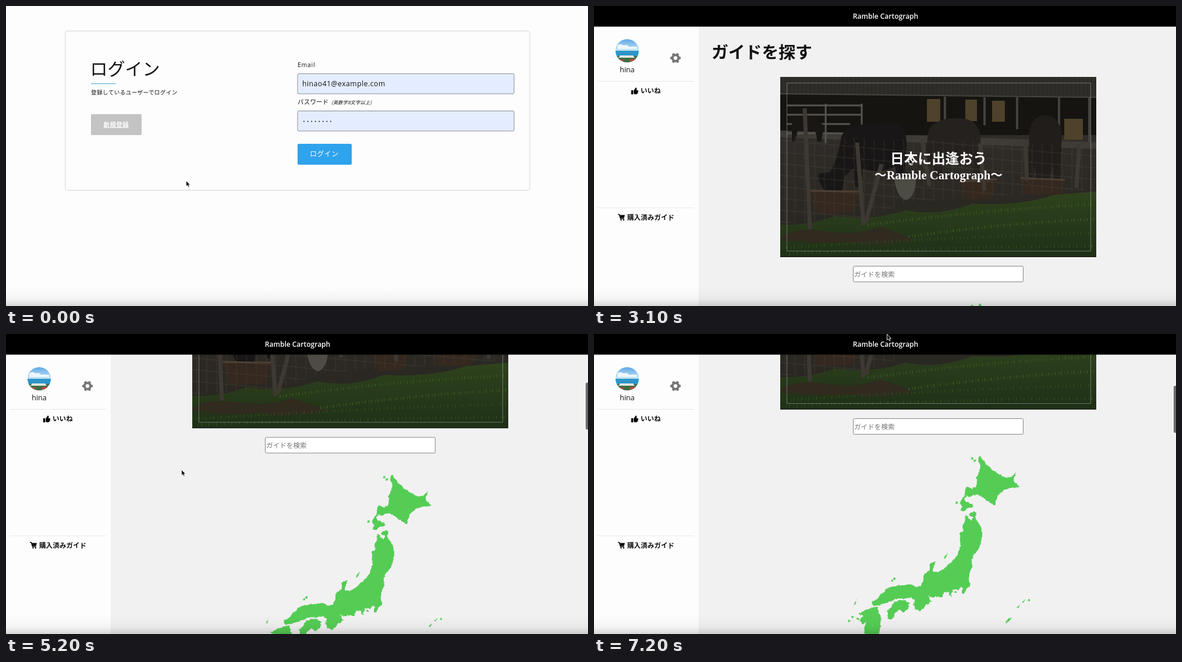
An HTML page for the animation above (7.3 s loop, 1000x516 px).

```html
<!DOCTYPE html>
<html lang="ja">
<head>
<meta charset="utf-8">
<title>Login and guide search</title>
<style>
@property --scroll { syntax: "<number>"; inherits: true; initial-value: 0; }

html, body { margin: 0; width: 100%; height: 100%; overflow: hidden; background: #fdfdfd; }
svg { display: block; }
text { font-family: "Noto Sans CJK JP", "Noto Sans CJK", sans-serif; font-size: 11.6px; fill: #111; white-space: pre; }
.latin { font-family: "Open Sans", "Noto Sans", sans-serif; }
.bold { font-weight: 700; }
.mid { text-anchor: middle; }
.light { fill: #fff; }
.field { fill: #e4edff; stroke: #898d95; }

/* All timelines are paused and positioned by the --t clock (ms). */
.home, .scroller, .status, .thumb, .cursor {
  animation: 7300ms linear calc(var(--t, 0) * -1ms) infinite paused;
}
.home, .status, .thumb { animation-timing-function: step-end; }
.home { animation-name: home; }
.status { animation-name: status; }
.thumb { animation-name: thumb; }
.scroller { animation-name: scroll; }
.cursor { animation-name: cursor; }
.page { transform: translateY(calc(var(--scroll) * -1px)); }
.bar { transform: translateY(calc(37px + var(--scroll) * .172px)); }

@keyframes home { 0% { visibility: hidden; } 38.3%, 100% { visibility: visible; } }
@keyframes status { 0% { visibility: hidden; } 30.1% { visibility: visible; } 38.3%, 100% { visibility: hidden; } }
@keyframes thumb { 0% { opacity: 0; } 54.7%, 100% { opacity: 1; } }
@keyframes scroll {
  0%, 53.425% { --scroll: 0; animation-timing-function: cubic-bezier(.3, .1, .65, .5); }
  57.534% { --scroll: 55.5; }
  63.014% { --scroll: 163; animation-timing-function: cubic-bezier(.3, .732, .65, .9); }
  75.342% { --scroll: 286; animation-timing-function: cubic-bezier(.3, .54, .6, 1); }
  84.932%, 100% { --scroll: 302; }
}
@keyframes cursor {
  0%, 12.329% { transform: translate(309px, 300px); animation-timing-function: ease-in-out; }
  27.397%, 45.205% { transform: translate(541px, 262px); animation-timing-function: ease-in-out; }
  50.685%, 86.301% { transform: translate(301px, 233px); animation-timing-function: ease-in-out; }
  97.26%, 100% { transform: translate(503px, 0); }
}
</style>
</head>
<body>
<svg width="1000" height="516" viewBox="0 0 1000 516">
  <defs>
    <linearGradient id="dock" x2="0" y2="1">
      <stop offset="0" stop-color="#000" stop-opacity="0"/>
      <stop offset=".6" stop-color="#000" stop-opacity=".035"/>
      <stop offset="1" stop-color="#000" stop-opacity=".15"/>
    </linearGradient>
    <linearGradient id="sky" x2="0" y2="1">
      <stop offset="0" stop-color="#5fa9e6"/>
      <stop offset="1" stop-color="#d8eefa"/>
    </linearGradient>
    <linearGradient id="soil" x2="0" y2="1">
      <stop offset="0" stop-color="#383632"/>
      <stop offset="1" stop-color="#2c2822"/>
    </linearGradient>
    <linearGradient id="grass" x2="0" y2="1">
      <stop offset="0" stop-color="#344a20"/>
      <stop offset="1" stop-color="#22351a"/>
    </linearGradient>
    <linearGradient id="chrome" x2="0" y2="1">
      <stop offset="0" stop-color="#d5d8dc"/>
      <stop offset="1" stop-color="#c5c9cd"/>
    </linearGradient>
    <pattern id="roof" width="7" height="34" patternUnits="userSpaceOnUse" y="122">
      <path d="M0 0H7V34H0Z" fill="#34332e"/>
      <path d="M1 0V34" stroke="#2a2925"/>
    </pattern>
    <pattern id="mesh" width="17" height="20" patternUnits="userSpaceOnUse" patternTransform="skewY(5)">
      <path d="M0 3H17M4 0L6 20" fill="none" stroke="#5a5247" stroke-width=".7"/>
    </pattern>
    <clipPath id="photo"><path d="M320 122H863V432H320Z"/></clipPath>
    <clipPath id="face"><circle cx="57" cy="77" r="20"/></clipPath>
    <filter id="coast" x="-5%" y="-5%" width="110%" height="110%" color-interpolation-filters="sRGB">
      <feTurbulence type="fractalNoise" baseFrequency=".22" numOctaves="2" seed="4"/>
      <feDisplacementMap in="SourceGraphic" scale="4" xChannelSelector="R" yChannelSelector="G"/>
    </filter>
    <filter id="soft" x="-10%" y="-60%" width="120%" height="220%"><feGaussianBlur stdDeviation="2"/></filter>
  </defs>

  <g class="login">
    <path d="M0 0H1000V516H0Z" fill="#fdfdfd"/>
    <rect x="102" y="43" width="798" height="274" rx="4" fill="#fdfdfd" stroke="#dfdfdf" stroke-width="1.3"/>
    <text x="144.5" y="119" style="font-size:30px;font-weight:300">ログイン</text>
    <path d="M146 133.7H189" stroke="#67b5dc" stroke-width="1.2"/>
    <text x="146" y="152" style="font-size:9.6px;letter-spacing:.4px;font-weight:500">登録しているユーザーでログイン</text>
    <rect x="146" y="186" width="87" height="36" rx="2" fill="#c3c3c3"/>
    <text class="bold light" x="167.5" y="207.5" style="font-size:10.4px;letter-spacing:.5px;text-decoration:underline">新規登録</text>

    <text class="latin" x="501" y="105" style="font-size:10.5px;letter-spacing:.7px">Email</text>
    <rect class="field" x="501" y="116.5" width="372" height="34.5" rx="2"/>
    <text class="latin" x="509" y="138" style="font-size:12.2px;letter-spacing:.5px">hinao41@example.com</text>
    <text x="501" y="169" style="font-size:10.4px;letter-spacing:.3px">パスワード</text>
    <text x="559" y="169" style="font-size:8.2px;letter-spacing:.2px;font-style:italic">(英数字8文字以上)</text>
    <rect class="field" x="501" y="180.5" width="372" height="34.5" rx="2"/>
    <path d="M512 198.5H559" stroke="#111" stroke-width="2" stroke-linecap="round" stroke-dasharray="0 6.55"/>
    <rect x="501" y="237" width="93" height="36" rx="2" fill="#2fa3ec"/>
    <text class="light" x="522" y="259.3" style="font-size:12px;letter-spacing:.3px">ログイン</text>
  </g>

  <g class="home">
   <g class="scroller">
    <path d="M0 0H1000V516H0Z" fill="#f2f1f2"/>
    <g class="page">
      <text class="bold" x="202" y="89.5" style="font-size:28.8px">ガイドを探す</text>

      <g clip-path="url(#photo)">
        <path d="M320 122H863V432H320Z" fill="url(#soil)"/>
        <path d="M320 152H863V222H320Z" fill="#171613"/>
        <path d="M320 122H863V156L320 150Z" fill="url(#roof)"/>
        <path d="M320 151L863 157" stroke="#504e46" stroke-width="2"/>
        <path d="M572 160h23v39h-23zM638 161h20v37h-20zM684 163h22v36h-22zM808 194h32v36h-32z" fill="#584a30"/>
        <path d="M603 156V200M671 157V205M727 157V212M799 157V230M851 157V234" stroke="#4c4a43" stroke-width="4"/>
        <path d="M320 214L863 234V246L320 226Z" fill="#45423c"/>
        <path d="M332 171H460M332 187H460M332 203H440M332 219H430M398 168V236M460 168V205" fill="none" stroke="#5f5e58" stroke-width="3"/>
        <path d="M340 193Q360 186 384 194L396 207 390 233H384L380 214H350L346 234H340Z" fill="#1c1a18"/>

        <path d="M425 224Q436 202 470 204L519 202Q538 208 537 240L533 310H522L518 276Q490 290 462 280L459 312H449L445 280 430 294Q428 327 413 339Q396 340 395 316Q383 296 386 288L405 286Q419 264 425 224Z" fill="#1b1918"/>
        <path d="M575 214Q586 192 624 193 659 191 664 224L662 292H652L646 258Q620 272 599 263L600 300H590L584 276Q570 279 568 262Z" fill="#292521"/>
        <path d="M748 214Q755 187 777 188 801 190 804 224L801 298H791L788 270 782 301Q770 313 760 298L758 272 754 298H746Z" fill="#24201d"/>
        <path d="M372 318L455 319 445 355 384 357ZM628 302L692 298 681 332 642 334ZM733 296L809 299 799 325 742 324Z" fill="#3a2c22"/>
        <path d="M372 318L455 319M628 302L692 298M733 296L809 299" stroke="#554538" stroke-width="3"/>
        <path d="M516 294H553Q554 326 537 334 519 330 516 294Z" fill="#55554d"/>

        <path d="M320 376Q370 378 414 361 478 371 535 351 590 363 650 340 730 345 790 325L863 319V432H320Z" fill="url(#grass)"/>
        <path d="M320 397Q350 379 400 388 460 394 490 380 525 390 550 402 480 415 440 406 380 410 320 402Z" fill="#352f22"/>
        <g fill="none" stroke-width="5">
          <path d="M470 377Q650 352 860 341M540 397Q690 375 862 366" stroke="#3c5b22" stroke-dasharray="2 5 1 3"/>
          <path d="M325 416Q580 399 862 390M330 426Q600 415 862 413" stroke="#334f20" stroke-dasharray="1 4 2 6"/>
        </g>
        <path d="M320 222L540 230 863 238V315L540 337 470 365 320 374Z" fill="url(#mesh)" opacity=".65"/>
        <path d="M362 176L371 384M452 235L463 377M494 272L467 372M564 229L576 310M663 236L671 318M741 238L744 300M834 237L829 313" fill="none" stroke="#443e36" stroke-width="7"/>
        <path d="M320 122H863V432H320Z" fill="#000" opacity=".1"/>
        <path d="M320 431.5H863" stroke="#151515"/>
      </g>
      <path d="M331.5 132.5H853.5V421.5H331.5Z" fill="none" stroke="#aaa" stroke-opacity=".55"/>
      <text class="bold light mid" x="592" y="271" style="font-size:23.7px">日本に出逢おう</text>
      <text class="bold light mid" x="592" y="298" style="font-family:'Liberation Serif','Noto Sans CJK JP',serif;font-size:20.7px">〜Ramble Cartograph〜</text>

      <rect x="445.5" y="447.5" width="292" height="27" rx="2" fill="#fff" stroke="#858585"/>
      <text x="447" y="465.5" style="fill:#757575">ガイドを検索</text>

      <g transform="translate(0 302)" fill="#55cd55" filter="url(#coast)">
        <path d="M664 210L673 223 684 233 697 242 707 247 717 246 725 238 721 249 722 255 732 262 721 265 712 266 703 269 694 278 688 295 679 289 668 281 659 276 652 277 645 281 640 277 637 283 640 289 649 292 652 297 643 299 636 305 630 304 632 297 629 289 633 283 637 276 638 265 641 262 649 266 656 263 658 257 657 246 662 238 664 227 660 218 660 212Z"/>
        <path d="M647 306L657 306 656 318 664 330 667 345 665 358 661 370 652 380 649 390 650 400 645 412 644 425 647 433 640 438 636 447 632 446 634 438 630 434 626 441 622 439 617 440 613 452 608 443 602 444 597 453 586 452 577 453 572 448 580 460 570 467 560 477 552 474 549 464 551 457 546 453 535 455 522 455 512 459 500 463 490 466 480 468 477 461 485 457 494 447 504 437 517 433 532 432 545 430 552 435 562 432 566 424 566 415 577 405 577 395 587 391 583 401 582 408 590 410 603 403 613 393 624 381 629 366 630 350 628 343 634 339 633 330 637 322 639 310 643 317 649 320 652 315 645 312Z"/>
        <path d="M503 476L511 470 515 461 524 458 535 458 542 463 540 472 532 479 525 474 517 480 511 492 504 489 505 480Z"/>
        <path d="M487 470L478 471 470 474 462 477 454 481 463 486 456 491 462 500 468 494 464 505 466 520 459 534 470 544 476 532 479 546 487 530 492 505 494 489 490 480Z"/>
        <path d="M601 385L607 376 606 382 603 387ZM447 466L452 454 450 463ZM707 499L710 490 719 486 714 492ZM726 471L732 465 730 471ZM734 461L742 456 738 461Z"/>
        <path d="M650 214h.1M654 218h.1M623 290h.1M516 421h.1M512 424h.1M439 493h.1M444 487h.1M747 458h.1M453 490h.1M621 444h.1" stroke="#55cd55" stroke-width="4" stroke-linecap="round"/>
      </g>
    </g>
    <g class="thumb"><rect class="bar" x="996" width="8" height="81" rx="3" fill="#6c6c6c"/></g>
   </g>

    <path d="M0 35H180V516H0Z" fill="#fdfdfd"/>
    <g clip-path="url(#face)">
      <path d="M37 57H77V80H37Z" fill="url(#sky)"/>
      <path d="M40 68q5-5 11 0q6-3 9 2h14v4H40z" fill="#eef7fc"/>
      <path d="M37 77H77V88H37Z" fill="#2c95c8"/>
      <path d="M37 86H77V97H37Z" fill="#3d6d45"/>
      <path d="M45 85h22l3 4H42z" fill="#dfe6df"/>
      <path d="M62 91h12v4H60zM46 92h5v3h-5z" fill="#b5473f"/>
    </g>
    <text class="latin mid" x="57" y="114" style="font-size:12.5px">hina</text>
    <g fill="none" stroke="#757575">
      <circle cx="140" cy="89.5" r="5.2" stroke-width="4"/>
      <circle cx="140" cy="89.5" r="7.5" stroke-width="3" pathLength="12" stroke-dasharray="1 1" stroke-dashoffset=".5"/>
    </g>
    <path d="M6 129.5H172M6 347H172" stroke="#e6e6e6"/>
    <path d="M64 145h3.3v7H64zM68.3 145.5L71 141.5Q72 139.5 73 141 74.2 143 72.8 145H75.5Q76.6 146 75.8 147.2 76.3 148.8 75 149.5 75 151.5 73 151.8H70L68.3 151Z"/>
    <text class="bold" x="80" y="150">いいね</text>
    <path d="M41 358.5H43.5L45.5 365.5H51.5" fill="none" stroke="#000" stroke-width="1.5"/>
    <path d="M43.8 359.5H53L51.7 364.5H45.3Z"/>
    <circle cx="46.5" cy="367.7" r="1.2"/>
    <circle cx="51" cy="367.7" r="1.2"/>
    <text class="bold" x="57" y="367.5">購入済みガイド</text>

    <path d="M0 0H1000V35.5H0Z"/>
    <text class="latin light mid" x="501" y="22" style="font-size:12px;font-weight:600">Ramble Cartograph</text>
  </g>

  <path d="M0 486H1000V516H0Z" fill="url(#dock)"/>

  <g class="status">
    <path d="M0 500H334V516H0Z" fill="#000" opacity=".3" filter="url(#soft)"/>
    <path d="M-1 501.5H329Q332.5 501.5 332.5 505V517H-1Z" fill="url(#chrome)" stroke="#aeb1b4"/>
    <text x="2" y="511.8" style="font-size:8.3px">localhost を待機しています...</text>
  </g>

  <path class="cursor" d="M.5 .5V10.5L2.9 8.4 4.5 12 6.2 11.2 4.7 7.8H7.7Z" fill="#000" stroke="#fff" stroke-width=".9"/>
</svg>
<script>
const LOOP = 7300, STEP = 100;
const root = document.documentElement;
const start = performance.now();

function tick() {
  const t = (performance.now() - start) % LOOP;
  root.style.setProperty("--t", Math.floor(t / STEP) * STEP);
  requestAnimationFrame(tick);
}
tick();
</script>
</body>
</html>
```
